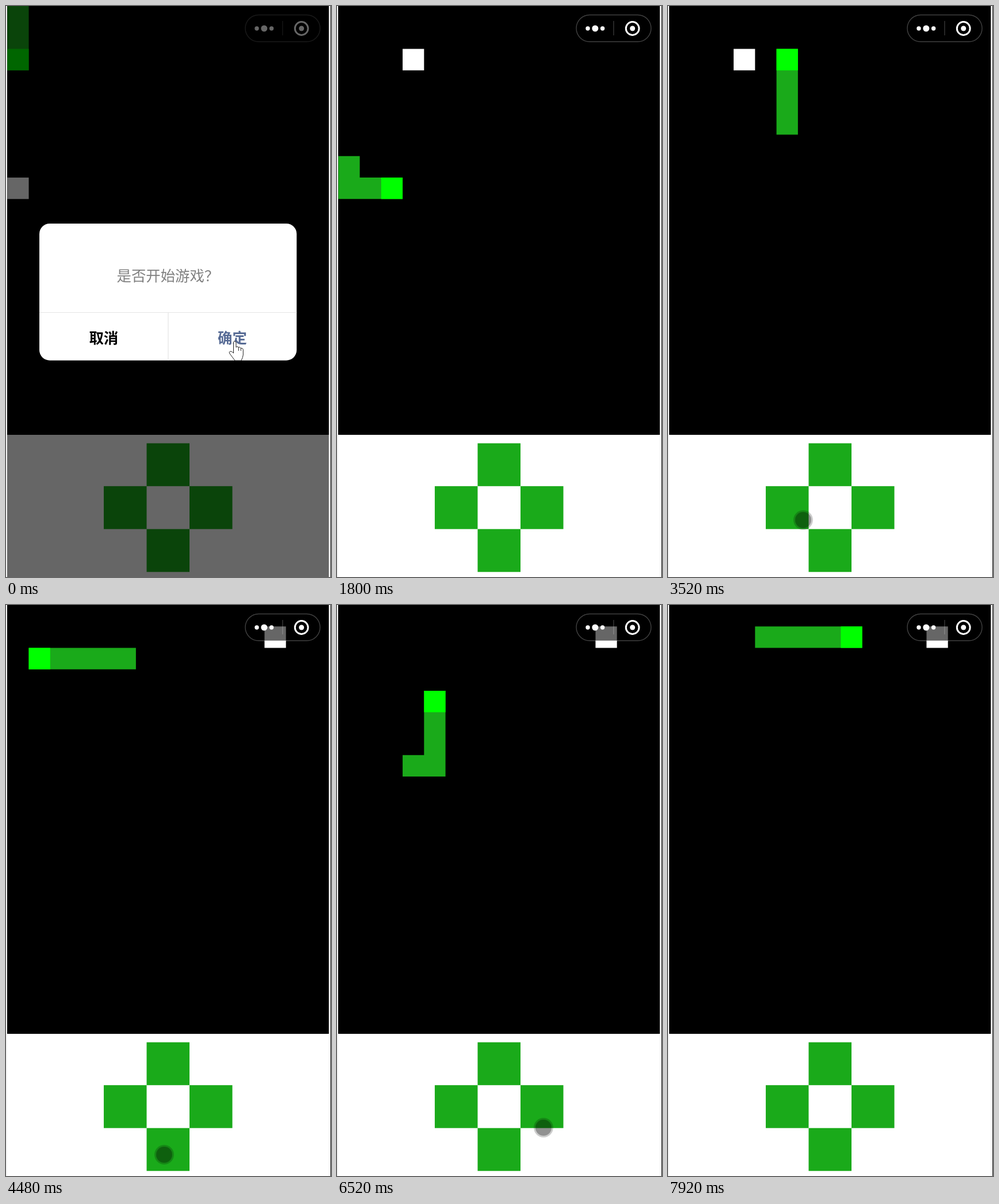
Recreate the animation shown at these times as an HTML page. Size 565 by 992 pixels, loop 8 s.

```html
<!DOCTYPE html>
<html lang="zh-CN">
<head>
<meta charset="utf-8">
<title>Snake</title>
<style>
  html, body { margin: 0; width: 100%; height: 100%; overflow: hidden; background: #fff; }
  svg { display: block; width: 100%; height: 100%; }
  text { font-family: "Noto Sans CJK SC", "Noto Sans CJK", sans-serif; font-size: 25.4px; }
  .bold { font-weight: 700; text-anchor: middle; }
</style>
</head>
<body>
<svg viewBox="0 0 565 992">
  <rect x="2" width="559.5" height="745"/>
  <rect id="food" fill="#fff"/>
  <polyline id="body" fill="none" stroke="#1aaa1a" stroke-linecap="square"/>
  <rect id="head" fill="#0f0"/>
  <g id="pad" fill="#1aaa1a"></g>

  <g fill="#fff">
    <rect x="416" y="15.5" width="130" height="46.5" rx="23.25" fill="#000" fill-opacity=".6" stroke="#fff" stroke-opacity=".25" stroke-width="1.4"/>
    <circle cx="436" cy="39" r="3.7"/>
    <circle cx="448.8" cy="39" r="5.5"/>
    <circle cx="461.6" cy="39" r="3.7"/>
    <rect x="480.3" y="26" width="1.2" height="25" opacity=".25"/>
    <circle cx="513.7" cy="39" r="11.4" fill="none" stroke="#fff" stroke-width="3"/>
    <circle cx="513.7" cy="39" r="4.5"/>
  </g>

  <g id="touch">
    <circle r="17" fill-opacity=".2"/>
    <circle r="14" fill-opacity=".29"/>
  </g>

  <g id="dialog">
    <rect x="2" width="559.5" height="992" fill-opacity=".6"/>
    <rect x="58" y="378" width="447.3" height="237.7" rx="18" fill="#fff"/>
    <path d="M58 532.5H505.3M282 532.5V615.5" stroke="#e5e5e5" stroke-width="1.2"/>
    <text x="192.5" y="478" fill="#808080">是否开始游戏？</text>
    <text class="bold" x="169.8" y="585.5">取消</text>
    <text class="bold" x="393.5" y="585.5" fill="#576b95">确定</text>
  </g>
  <path id="hand" fill="#fff" stroke="#222" stroke-linejoin="round"
    d="M395.500 603V585Q395.500 582.500 397.700 582.500T400 585V593Q402 590 404.300 593Q406.500 591.500 408.300 594.500Q412.300 594 412.300 598V606Q412 610 409 616H398L389 604Q387 601 389.500 600T395.500 603M404.300 593V599M408.300 594.500V599"/>

  <rect width="2" height="992" fill="#f2f2f2"/>
  <rect x="561.5" width="3.5" height="992" fill="#f4f4f4"/>
  <rect x="564" width="1" height="992" fill="#222"/>
</svg>
<script>
const $ = id => document.getElementById(id);
const set = (el, attrs) => Object.entries(attrs).forEach(([k, v]) => el.setAttribute(k, v));
const LOOP = 8000, TICK = 200, FIRST = 300, LEFT = 2.3, CELL = 37.26;

// Snake route as direction + number of cells
const STEP = { U: [0, -1], D: [0, 1], L: [-1, 0], R: [1, 0] };
const trail = [[0, 0], [0, 1], [0, 2]];
for (const [dir, count] of ["D6", "R5", "U6", "L4", "D5", "R3", "U6", "R4"]) {
  for (let i = 0; i < +count; i++) {
    const [x, y] = trail[trail.length - 1];
    trail.push([x + STEP[dir][0], y + STEP[dir][1]]);
  }
}

// Each meal appears one move after the previous one is eaten
const meals = [[0, 8], [3, 2], [12, 1]];

// Pointer stops: arrival, departure, x, y
const stops = [
  [0, 900, 401, 598],
  [1080, 1640, 380, 895],
  [1800, 2080, 360, 1020],
  [2320, 2480, 285, 808],
  [2880, 3880, 235, 893],
  [4200, 4700, 275, 955],
  [5240, 5480, 371, 893],
  [5800, 6080, 285, 812],
  [6500, 7480, 359, 908],
  [7800, LOOP, 340, 1020]
];

const square = (el, x, y, width) => set(el, { x, y, width, height: width });
const cell = (el, [col, row]) => square(el, LEFT + col * CELL, row * CELL, CELL);

for (const [dx, dy] of Object.values(STEP)) {
  const button = document.createElementNS("http://www.w3.org/2000/svg", "rect");
  square(button, LEFT + CELL * (6.5 + 2 * dx), 834.2 + CELL * 2 * dy, CELL * 2);
  $("pad").append(button);
}

function drawSnake(t) {
  const end = 3 + Math.max(0, Math.floor((t - FIRST) / TICK) + 1);
  const route = trail.slice(0, end);
  let eaten = 0;
  route.slice(0, -1).forEach(([x, y]) => {
    if (x === meals[eaten][0] && y === meals[eaten][1]) eaten++;
  });
  const snake = route.slice(-3 - eaten);
  cell($("food"), meals[eaten]);
  cell($("head"), snake[snake.length - 1]);
  const middle = ([x, y]) => [LEFT + (x + .5) * CELL, (y + .5) * CELL];
  set($("body"), { points: snake.map(middle).join(" "), "stroke-width": CELL });
}

function drawTouch(t) {
  const i = stops.findIndex(s => t < s[1]);
  const [arrive, , x, y] = stops[i];
  const [, leave, x0, y0] = stops[Math.max(0, i - 1)];
  const k = t >= arrive ? 1 : (t - leave) / (arrive - leave);
  const ease = k * k * (3 - 2 * k);
  set($("touch"), { transform: `translate(${x0 + (x - x0) * ease} ${y0 + (y - y0) * ease})` });
}

function drawDialog(t) {
  const k = Math.min(1, Math.max(0, (t - 160) / 280));
  set($("dialog"), { opacity: (1 - k) ** 1.5 });
  set($("hand"), { opacity: t < 240 ? 1 : 0 });
}

function frame() {
  const t = performance.now() % LOOP;
  drawSnake(t);
  drawTouch(t);
  drawDialog(t);
  requestAnimationFrame(frame);
}
frame();
</script>
</body>
</html>
```
